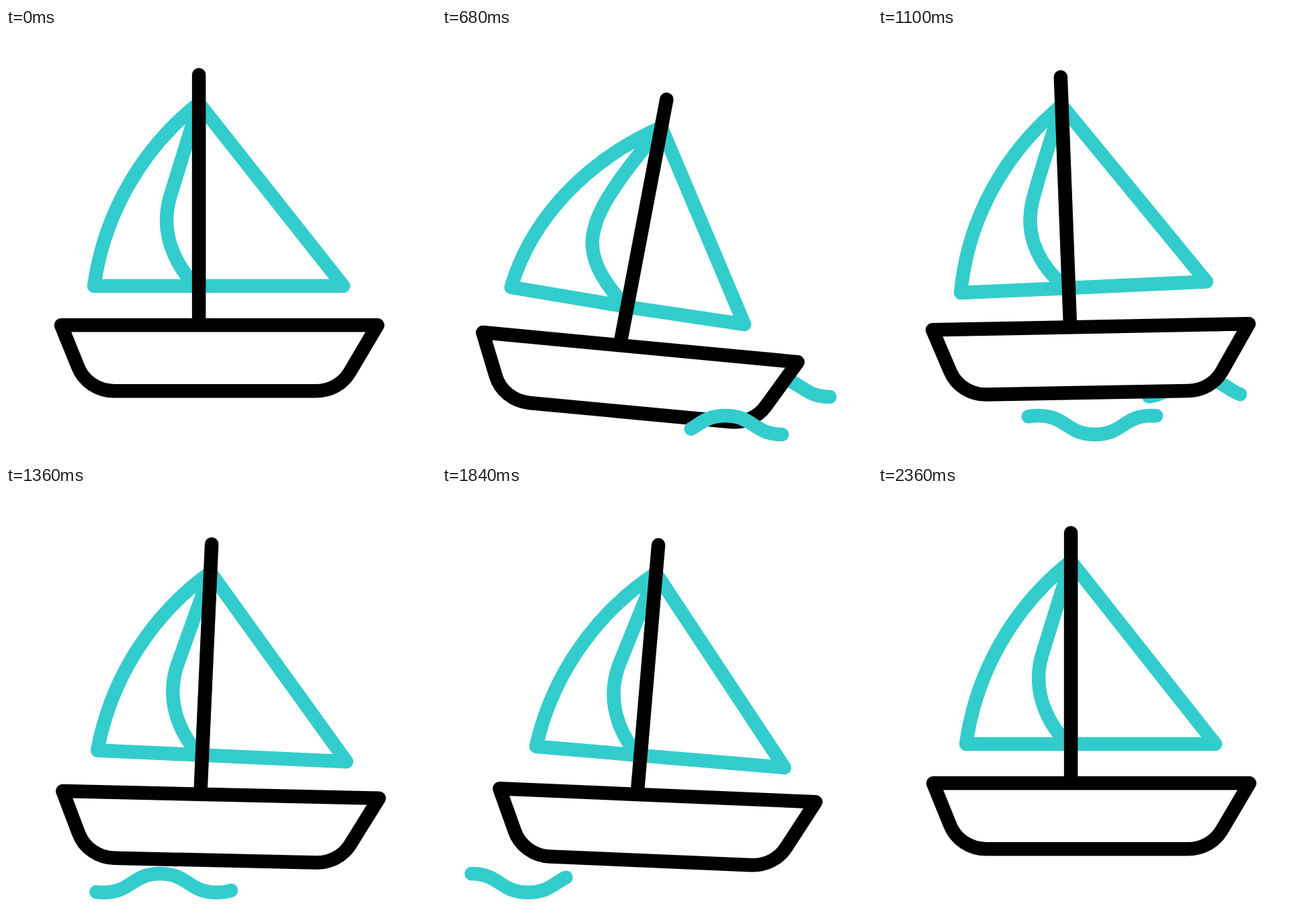
Recreate the animation shown at these times as an HTML page. Size 640 px wide and 640 px high, loop 2400 ms.

```html
<!DOCTYPE html>
<html lang="en">
<head>
<meta charset="utf-8">
<title>Sailing boat</title>
<style>
  html, body { margin: 0; width: 100%; height: 100%; overflow: hidden; background: #fff; }
  svg { display: block; width: 100%; height: 100%; }
  path { fill: none; stroke-width: 20.5; stroke-linecap: round; stroke-linejoin: round; }
  .teal { stroke: #3cc; }
  .ink { stroke: #000; }
  #hull { fill: #fff; }
</style>
</head>
<body>
<svg viewBox="0 0 640 640">
  <path id="back" class="teal" pathLength="1"/>
  <g id="boat">
    <g id="rig">
      <path id="jib" class="teal"/>
      <path id="main" class="teal"/>
      <path class="ink" d="M0-372.3V.3"/>
    </g>
    <path id="hull" class="ink" d="M82 442.3L107 504C115.500 526 137 540.200 161 540.200H461C482 540.200 501 530 511.500 512.500L553 442.300Z"/>
  </g>
  <path id="front" class="teal" pathLength="1"/>
</svg>
<script>
const LOOP = 2400, STEP = 20;
const HALF = 84.3;              // crest to trough, across
const DRIFT = HALF / LOOP;      // leftward speed of the water
const $ = id => document.getElementById(id);
const clamp = v => Math.min(1, Math.max(0, v));
const mix = (a, b, k) => a + (b - a) * k;
const ramp = (t, a, b) => clamp((t - a) / (b - a));
const ease = k => k * k * (3 - 2 * k);

// keys: [time, value] pairs, eased between neighbours
function at(keys, t) {
  for (let i = 1; i < keys.length; i++) {
    const [t0, a] = keys[i - 1], [t1, b] = keys[i];
    if (t < t1) return mix(a, b, ease(ramp(t, t0, t1)));
  }
  return keys[keys.length - 1][1];
}

const tilt = [[0, 0], [580, 6.1], [1090, -1.1], [1630, 3.68], [2165, 0]];
const shiftX = [[0, 0], [580, -30], [1090, -0.1], [1630, 2.4], [2090, 0]];
const shiftY = [[0, 0], [580, 36], [1090, 2.4], [1630, 31.8], [2090, 0]];
const wind = [[0, 0], [620, 1], [1330, 0]];

// sail points relative to the foot of the mast: calm and full of wind
const calm = {
  left: [-156, -58, -141, -165.5, -85, -263],
  right: [215, -58],
  fold: [-14, -284, -28, -238, -42.5, -192, -46, -181, -48, -168, -48, -155,
         -48, -120, -30, -82, -5, -60]
};
const full = {
  left: [-175.6, -54.4, -165, -162, -99, -262],
  right: [175.5, -65],
  fold: [-24, -288, -55, -232, -66, -190, -69, -179, -70.5, -166, -70.5, -155,
         -70.5, -118, -42, -88, -5, -60]
};
const blend = (name, k) => calm[name].map((v, i) => mix(v, full[name][i], k).toFixed(2));

// wave drawn from its right end, a trough, towards the left
function wave(x, low, count) {
  let d = `M${x} ${low}`;
  for (let i = 0; i < count; i++) {
    const y0 = i % 2 ? low - 28 : low, y1 = i % 2 ? low : low - 28;
    const x0 = x - i * HALF, mid = x0 - HALF / 2;
    d += `C${mid} ${y0} ${mid} ${y1} ${x0 - HALF} ${y1}`;
  }
  return d;
}

function trim(el, from, to, t) {
  el.style.display = to - from > 0.0005 ? "" : "none";
  el.setAttribute("stroke-dasharray", `${Math.max(0, to - from)} 3`);
  el.setAttribute("stroke-dashoffset", -from);
  el.setAttribute("transform", `translate(${-DRIFT * t} 0)`);
}

function draw(t) {
  const r = at(tilt, t), k = at(wind, t);
  $("boat").setAttribute("transform",
    `translate(${at(shiftX, t)} ${at(shiftY, t)}) rotate(${r} 317.5 491)`);
  $("rig").setAttribute("transform", `translate(287.1 442) rotate(${r})`);

  const l = blend("left", k);
  $("jib").setAttribute("d",
    `M0 -58L${l[0]} ${l[1]}C${l.slice(2).join(" ")} 0 -330C${blend("fold", k).join(" ")}`);
  $("main").setAttribute("d", `M0 -330L${blend("right", k).join(" ")}L0 -58Z`);

  const lead = ramp(t, 240, 1600);
  trim($("front"), ramp(t, 815, 2360), lead, t);
  trim($("back"), ramp(t, 980, 2350), lead, t);
}

$("front").setAttribute("d", wave(530, 605, 5));
$("back").setAttribute("d", wave(601, 549, 3));

let start;
function tick(now) {
  start ??= now;
  const t = (now - start) % LOOP;
  draw(Math.min(LOOP - 2 * STEP, Math.floor(t / STEP) * STEP));
  requestAnimationFrame(tick);
}
draw(0);
requestAnimationFrame(tick);
</script>
</body>
</html>
```
